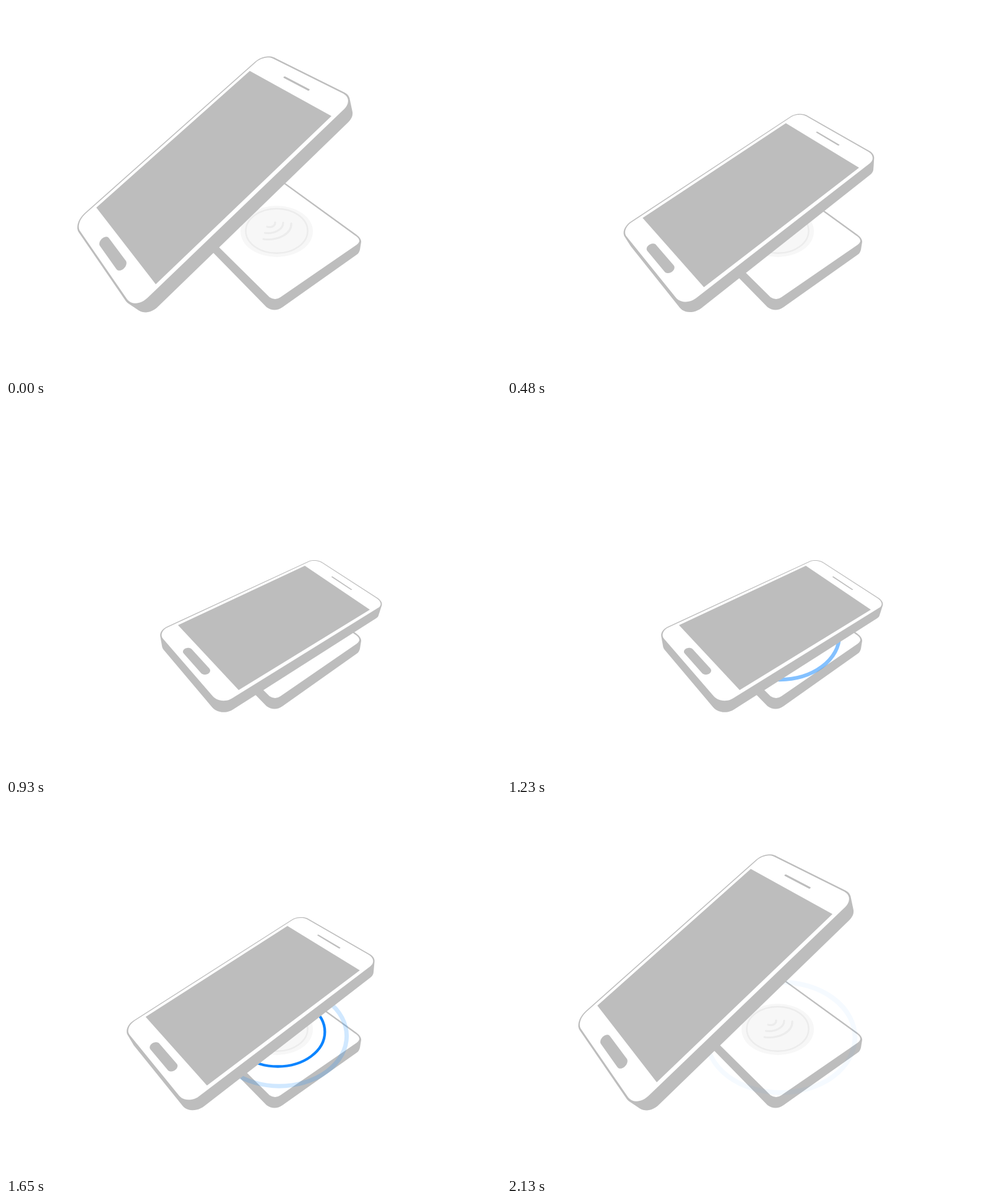
Animation of 800 by 600 pixels, one loop 3180 ms. Source, as an HTML page with a canvas:

```html
<!DOCTYPE html>
<html lang="en">
<head>
<meta charset="utf-8">
<title>Wireless charging</title>
<style>
  html, body { margin: 0; width: 100%; height: 100%; overflow: hidden; background: #fff; }
  canvas { display: block; width: 800px; height: 600px; }
</style>
</head>
<body>
<canvas id="stage" width="800" height="600"></canvas>
<script>
const ctx = document.getElementById('stage').getContext('2d');
const LOOP = 3180, STEP = 30, MOVE = 900, LAST_CHANGE = 2130;
const GRAY = '#bdbdbd', WHITE = '#fff', BLUE = '#0a84ff';

// Screen corners (TL, TR, BR, BL): raised, lowered, and the bow of the path between.
const RAISED  = [[394, 105], [526, 178], [242, 450], [146, 326]];
const LOWERED = [[483, 260], [588, 331], [376, 461], [278, 356]];
const BOW     = [[33, 0], [37, 0], [13, -5], [5, 2]];
// Homogeneous thickness vectors of the phone body.
const DEPTH_RAISED = [19, 22.3, 0.0272], DEPTH_LOWERED = [7.35, 21, 0.0197];
const ASPECT = 1.77;

// Ring life: age in ms, x radius, opacity.
const RING_KEYS = [[-240, 50, 0], [-60, 69.5, 1], [0, 76, 1], [60, 83, 0.85], [180, 96.5, 0.5],
                   [300, 109, 0.19], [360, 114.5, 0.12], [480, 120, 0.04], [540, 123, 0]];
const RING_STARTS = [1050, 1350, 1650];

const PAD_BODY = new Path2D('M446 282.6L566 369.5Q574 375.5 574 381.5L572 394Q571 399 567 402L447 487Q434 496 421 487L331 395Z');
const PAD_TOP = new Path2D('M446 285.2L564 371Q578 379.5 564 388L443.500 471Q435 477 426 471L340 386Z');
const WAVES = new Path2D('M422 357C429 359 435 356 435 350M418.500 367C432 369 448 362 448 350.5M416 377C440 380 462 368 461 351.5');

const lerp = (a, b, k) => a + (b - a) * k;
const clamp = x => Math.min(1, Math.max(0, x));
const smooth = x => x * x * (3 - 2 * x);

function fillPath(path, color) {
  ctx.fillStyle = color;
  ctx.fill(path);
}

function polygon(points) {
  const path = new Path2D();
  points.forEach(([x, y]) => path.lineTo(x, y));
  path.closePath();
  return path;
}

function ellipse(cx, cy, rx, ry) {
  const path = new Path2D();
  path.ellipse(cx, cy, rx, ry, 0, 0, 2 * Math.PI);
  return path;
}

// Rounded rectangle in screen units (u across, v along the phone).
function roundRect(u0, v0, u1, v1, r) {
  const rv = r / ASPECT, n = 12, points = [];
  const centres = [[u1 - r, v1 - rv], [u0 + r, v1 - rv], [u0 + r, v0 + rv], [u1 - r, v0 + rv]];
  centres.forEach(([u, v], corner) => {
    for (let i = 0; i <= n; i++) {
      const a = (corner + i / n) * Math.PI / 2;
      points.push([u + r * Math.cos(a), v + rv * Math.sin(a)]);
    }
  });
  return points;
}

const OUTLINE = roundRect(-0.045, -0.131, 1.047, 1.128, 0.127);
const FACE = roundRect(-0.033, -0.123, 1.035, 1.12, 0.115);
const BUTTON = roundRect(0.315, 1.037, 0.695, 1.087, 0.044);
const SPEAKER = roundRect(0.345, -0.065, 0.655, -0.055, 0.008);
const SCREEN = [[0, 0], [1, 0], [1, 1], [0, 1]];

// Perspective map of the unit square onto four corners, plus a depth offset.
function projector([p, q, r, s], depth) {
  const ax = q[0] - r[0], ay = q[1] - r[1];
  const bx = s[0] - r[0], by = s[1] - r[1];
  const sx = p[0] - q[0] + r[0] - s[0], sy = p[1] - q[1] + r[1] - s[1];
  const det = ax * by - ay * bx;
  const g = (sx * by - sy * bx) / det, h = (ax * sy - ay * sx) / det;
  return (u, v, z = 0) => {
    const w = 1 + g * u + h * v + z * depth[2];
    return [0, 1].map(i =>
      (p[i] + u * (q[i] * (1 + g) - p[i]) + v * (s[i] * (1 + h) - p[i]) + z * depth[i]) / w);
  };
}

function hull(points) {
  const sorted = points.slice().sort((a, b) => a[0] - b[0] || a[1] - b[1]);
  const turn = (o, a, b) => (a[0] - o[0]) * (b[1] - o[1]) - (a[1] - o[1]) * (b[0] - o[0]);
  const chain = list => {
    const out = [];
    for (const pt of list) {
      while (out.length > 1 && turn(out.at(-2), out.at(-1), pt) <= 0) out.pop();
      out.push(pt);
    }
    out.pop();
    return out;
  };
  return [...chain(sorted), ...chain(sorted.reverse())];
}

function drawPad() {
  fillPath(PAD_BODY, GRAY);
  fillPath(PAD_TOP, WHITE);
  fillPath(ellipse(437.5, 364.5, 58.5, 41.5), '#f7f7f7');
  ctx.strokeStyle = '#ececec';
  ctx.lineCap = 'round';
  ctx.lineWidth = 2.5;
  ctx.stroke(ellipse(437.5, 363.7, 50, 36));
  ctx.lineWidth = 3.2;
  ctx.stroke(WAVES);
}

function drawRing(age) {
  const i = RING_KEYS.findIndex(key => key[0] > age);
  if (i < 1) return;
  const from = RING_KEYS[i - 1], to = RING_KEYS[i];
  const k = (age - from[0]) / (to[0] - from[0]);
  const rx = lerp(from[1], to[1], k), grow = rx - 50.5;
  ctx.globalAlpha = lerp(from[2], to[2], k);
  ctx.strokeStyle = BLUE;
  ctx.lineWidth = 4.3 + Math.max(0, rx - 76) * 0.08;
  ctx.stroke(ellipse(437.5 + grow * 0.07, 363.5 + grow * 0.2, rx, 36.5 + grow * 0.76));
  ctx.globalAlpha = 1;
}

function drawPhone(lowered) {
  const k = lowered + 0.18 * lowered * (1 - lowered);
  const corners = RAISED.map((pt, c) =>
    pt.map((x, i) => lerp(x, LOWERED[c][i], k) + BOW[c][i] * k * (1 - k)));
  const project = projector(corners, DEPTH_RAISED.map((d, i) => lerp(d, DEPTH_LOWERED[i], k)));
  const place = (shape, z) => shape.map(([u, v]) => project(u, v, z));
  fillPath(polygon(hull([...place(OUTLINE, 0), ...place(OUTLINE, 1)])), GRAY);
  fillPath(polygon(place(FACE)), WHITE);
  for (const shape of [SCREEN, BUTTON, SPEAKER]) fillPath(polygon(place(shape)), GRAY);
}

function draw(time) {
  const t = Math.min(LAST_CHANGE, Math.floor(time / STEP) * STEP);
  ctx.fillStyle = WHITE;
  ctx.fillRect(0, 0, 800, 600);
  drawPad();
  RING_STARTS.forEach(start => drawRing(t - start));
  drawPhone(smooth(clamp((t - 30) / MOVE)) - smooth(clamp((t - 1230) / MOVE)));
}

const begin = performance.now();
function tick() {
  draw((performance.now() - begin) % LOOP);
  requestAnimationFrame(tick);
}
tick();
</script>
</body>
</html>
```
